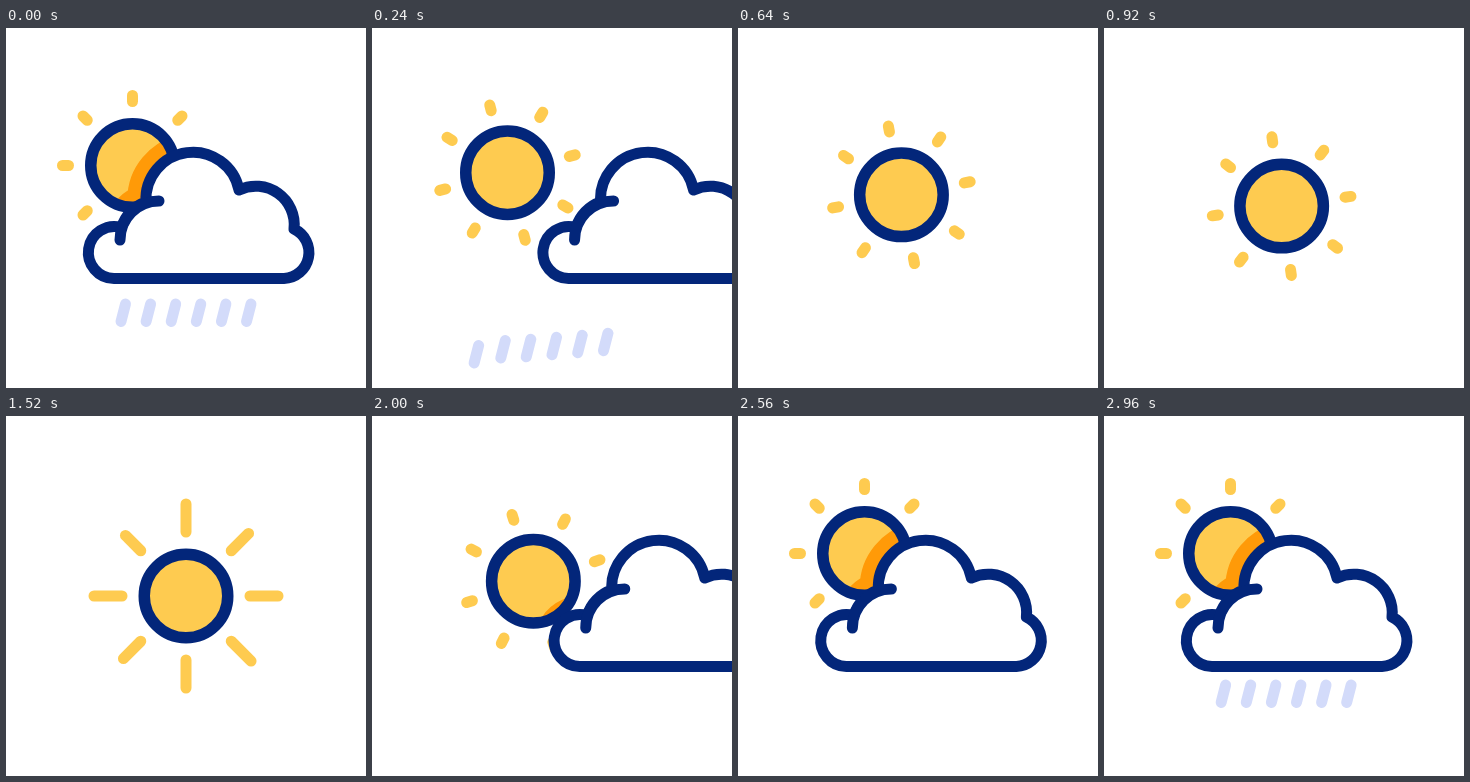
An HTML page with a canvas for the animation above (3 s loop, 360 by 360 pixels).

```html
<!DOCTYPE html>
<html lang="en">
<head>
<meta charset="utf-8">
<title>Sun, cloud and rain</title>
<style>
html, body { margin: 0; height: 100%; overflow: hidden; background: #fff; }
canvas { display: block; width: 360px; height: 360px; }
</style>
</head>
<body>
<canvas width="360" height="360"></canvas>
<script>
const canvas = document.querySelector('canvas');
const ratio = window.devicePixelRatio || 1;
canvas.width = canvas.height = 360 * ratio;
const ctx = canvas.getContext('2d');

const NAVY = '#03267a', YELLOW = '#fecb50', ORANGE = '#ff9a08', RAIN = '#d3dbfa';
const LOOP = 3000, STEP = 40;
const RAY_REACH = [1, 0.84, 1, 1, 1, 0.84, 1, 0.71]; // clockwise from the first ray
const DROP_SPEED = [1.42, 1.25, 1.21, 1.14, 1.07, 1];

const cloud = new Path2D(
  'M115.5 199.5A26 26 0 1 0 108 250.5H278A26 26 0 0 0 288 201' +
  'A38.5 38.5 0 0 0 233 162A47 47 0 0 0 140 174A39 39 0 0 0 115.5 199.5Z');
const curl = new Path2D('M114 212A39 39 0 0 1 153 173');
const disc = new Path2D();
disc.arc(0, 0, 41.75, 0, 2 * Math.PI);

const span = (t, from, to) => Math.min(1, Math.max(0, (t - from) / (to - from)));
const smooth = u => u * u * (3 - 2 * u);

function sunShift(t) {
  return t < 1400 ? smooth(span(t, 0, 1070) ** 0.9) : 1 - smooth(span(t, 1658, 2518));
}

function cloudShift(t) {
  return 300 * (t < 1400 ? smooth(span(t, 0, 667)) : (1 - span(t, 1706, 2663)) ** 3);
}

function stroke(color, width, path) {
  ctx.strokeStyle = color;
  ctx.lineWidth = width;
  ctx.stroke(path);
}

function line(x1, y1, x2, y2, color) {
  const path = new Path2D();
  path.moveTo(x1, y1);
  path.lineTo(x2, y2);
  stroke(color, 11, path);
}

function drawSun(t, cloudX) {
  const p = sunShift(t);
  const x = 126.5 + 53.5 * p, y = 137.5 + 42.5 * p;
  const grow = 22 * (smooth(span(t, 1000, 1220)) - smooth(span(t, 1580, 1800)));

  ctx.save();
  ctx.translate(x, y);
  ctx.save();
  ctx.rotate(Math.PI * p);
  // the half turn swaps opposite rays, so index from the bottom
  for (let i = 0; i < 8; i++) {
    line(0, 64, 0, 70 + grow * RAY_REACH[i], YELLOW);
    ctx.rotate(Math.PI / 4);
  }
  ctx.restore();

  ctx.fillStyle = YELLOW;
  ctx.fill(disc);
  ctx.save();
  ctx.clip(disc);
  ctx.translate(cloudX - x, -y);
  stroke(ORANGE, 37, cloud);
  ctx.restore();
  stroke(NAVY, 11.5, disc);
  ctx.restore();
}

function drawRain(t) {
  const s = t - 2800;
  if (s <= 0 && t > 700) return;
  DROP_SPEED.forEach((speed, i) => {
    const fall = s > 0 ? -44 + 0.276 * s - 0.00028 * s * s
                       : speed * (0.09 * t + 0.000132 * t * t);
    const x = 119.5 + 25.1 * i - 0.31 * fall, y = 276 + fall;
    line(x, y, x - 4.5, y + 17.5, RAIN);
  });
}

function drawCloud(x) {
  ctx.save();
  ctx.translate(x, 0);
  ctx.fillStyle = '#fff';
  ctx.fill(cloud);
  stroke(NAVY, 11, cloud);
  stroke(NAVY, 11, curl);
  ctx.restore();
}

function draw(t) {
  const cloudX = cloudShift(t);
  ctx.setTransform(ratio, 0, 0, ratio, 0, 0);
  ctx.lineCap = ctx.lineJoin = 'round';
  ctx.fillStyle = '#fff';
  ctx.fillRect(0, 0, 360, 360);
  drawSun(t, cloudX);
  drawRain(t);
  drawCloud(cloudX);
}

const start = performance.now();
function tick() {
  const t = (performance.now() - start) % LOOP;
  draw(Math.floor(t / STEP) * STEP);
  requestAnimationFrame(tick);
}
tick();
</script>
</body>
</html>
```
